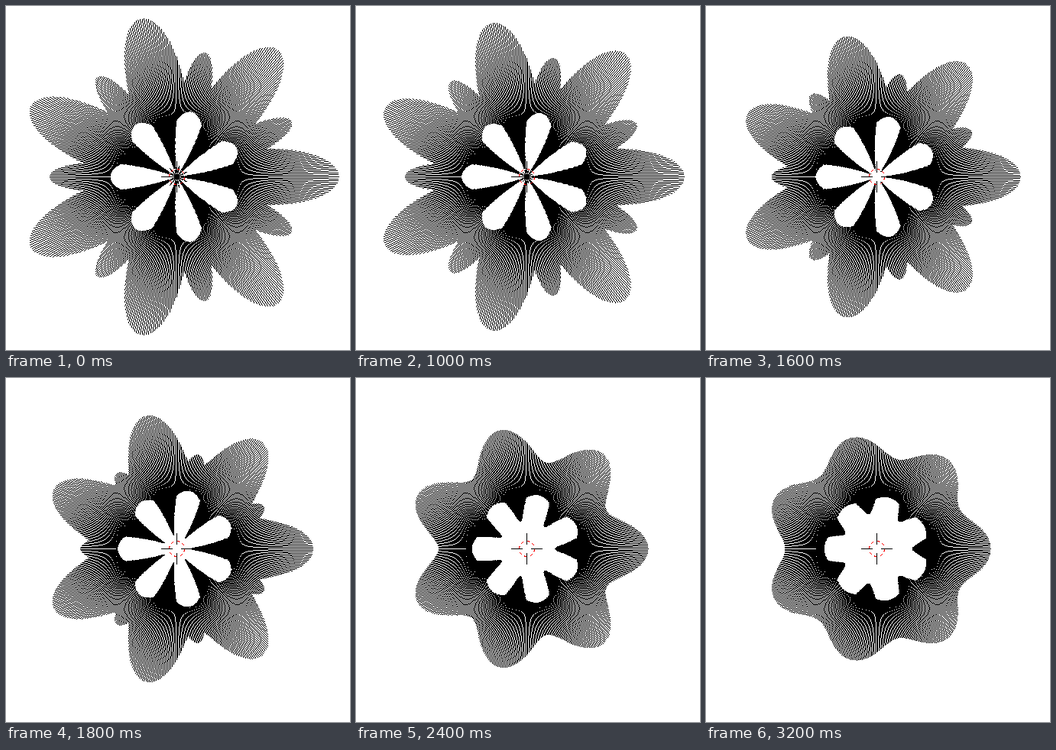
Recreate the animation shown at these times as an HTML page with a canvas. Size 450x450 px, loop 3.6 s.

```html
<!DOCTYPE html>
<html lang="en">
<head>
<meta charset="utf-8">
<title>Spoke flower</title>
<style>
  html, body { margin: 0; width: 100%; height: 100%; overflow: hidden; background: #fff; }
  canvas { display: block; width: 450px; height: 450px; image-rendering: pixelated; }
</style>
</head>
<body>
<canvas id="stage" width="450" height="450"></canvas>
<script>
const SIZE = 450, CX = 223, CY = 223, SPOKES = 499, LOOP = 3600;
const BLACK = 0xff000000, WHITE = 0xffffffff, RED = 0xff0000ff;

// How far the petals have shrunk in each step, in pixels at the tip
const SHRINK = [0, 0.5, 1.3, 6, 12, 18, 24, 33.5, 41, 48, 53, 56, 59, 62, 63];

const ctx = document.getElementById('stage').getContext('2d');
const image = ctx.createImageData(SIZE, SIZE);
const pixels = new Uint32Array(image.data.buffer);

function plot(x, y, color) {
  pixels[Math.round(y) * SIZE + Math.round(x)] = color;
}

// Hard-edged radial line between two signed radii
function spoke(angle, from, to) {
  const c = Math.cos(angle), s = Math.sin(angle);
  const major = Math.max(Math.abs(c), Math.abs(s));
  const dx = c / major, dy = s / major;
  const end = Math.round(to * major);
  for (let i = Math.round(from * major); i <= end; i++) {
    plot(CX + i * dx, CY + i * dy, BLACK);
  }
}

// Three wavy rings; each spoke spans from the innermost to the outermost
function flower(shrink) {
  const a = 1 - shrink / 83;
  for (let k = 0; k < SPOKES; k++) {
    const angle = k * 2 * Math.PI / SPOKES;
    const u = Math.cos(7 * angle);
    const outer = 128.5 + a * (27 + 60 * u - 4 * u * u);
    const inner = 66 + a * (10 - 90 * u);
    const cap = 63.5 + a * 12 * (1 - u);
    spoke(angle, Math.min(outer, inner, cap), Math.max(outer, inner, cap));
  }
}

function cursor() {
  for (let i = 0; i < 160; i++) {
    const angle = i * Math.PI / 80;
    plot(CX + 10 * Math.cos(angle), CY + 10 * Math.sin(angle),
      Math.floor(i / 10) % 2 ? WHITE : RED);
  }
  for (let d = 6; d <= 20; d++) {
    for (const side of [-d, d]) {
      plot(CX + side, CY, BLACK);
      plot(CX, CY + side, BLACK);
    }
  }
}

function draw(step) {
  pixels.fill(WHITE);
  flower(SHRINK[step]);
  cursor();
  ctx.putImageData(image, 0, 0);
}

// First step lasts 600 ms, the last 400 ms, all others 200 ms
function stepAt(time) {
  return Math.min(SHRINK.length - 1, Math.max(0, Math.floor(time / 200) - 2));
}

let shown = -1;
const start = performance.now();
function tick() {
  const step = stepAt((performance.now() - start) % LOOP);
  if (step !== shown) draw(shown = step);
  requestAnimationFrame(tick);
}
tick();
</script>
</body>
</html>
```
